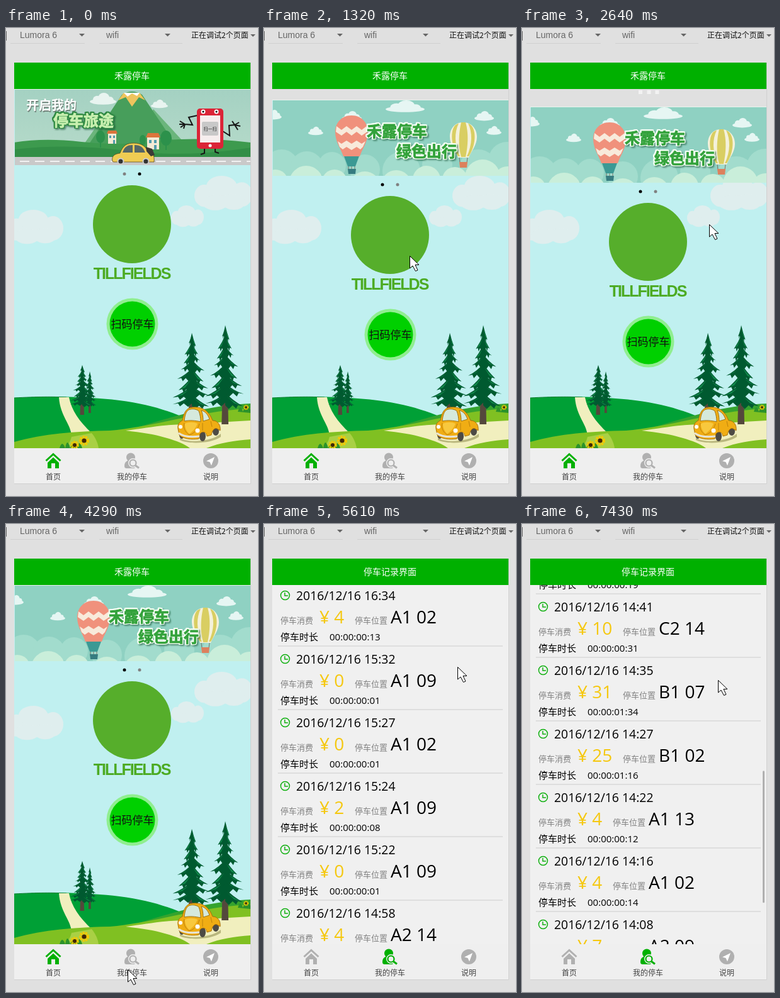
Animation, 400 px wide and 744 px high, one loop 8 s. Source, as an HTML page:

```html
<!DOCTYPE html>
<html lang="zh">
<head>
<meta charset="utf-8">
<title>停车小程序</title>
<style>
html, body { margin: 0; width: 100%; height: 100%; overflow: hidden; background: #e0e0e0; }
svg { display: block; width: 100vw; height: 100vh; }
text { font-family: "Noto Sans CJK SC", "Noto Sans CJK", "Noto Sans", sans-serif; }
.num { font-family: "Open Sans", "Noto Sans", sans-serif; }
.bar { font: 14px "Liberation Sans", Roboto, sans-serif; fill: #666; }
.mid { text-anchor: middle; }
.tab { font-size: 12px; fill: #444; text-anchor: middle; }
.art {
  --edge: #f4fff4; font-size: 24px; font-weight: 900; fill: #33a23b; stroke: #33a23b; stroke-width: .8px;
  filter: drop-shadow(1.2px 0 var(--edge)) drop-shadow(-1.2px 0 var(--edge)) drop-shadow(0 1.2px var(--edge))
    drop-shadow(0 -1.2px var(--edge)) drop-shadow(2px 2px 1px rgba(20, 80, 50, .55));
}
.trip { --edge: #2f8a43; fill: #c9f0b0; stroke: #c9f0b0; }
</style>
</head>
<body>
<svg viewBox="0 0 400 744" preserveAspectRatio="none">
<defs>
  <g id="cloud">
    <ellipse cx="50" cy="42" rx="50" ry="13"/><circle cx="28" cy="32" r="16"/>
    <circle cx="53" cy="24" r="21"/><circle cx="76" cy="34" r="14"/>
  </g>
  <g id="puff">
    <ellipse cx="50" cy="32" rx="44" ry="22"/><ellipse cx="17" cy="34" rx="17" ry="19"/>
    <ellipse cx="47" cy="17" rx="26" ry="17"/><ellipse cx="82" cy="32" rx="18" ry="21"/>
    <ellipse cx="36" cy="46" rx="22" ry="13"/><ellipse cx="68" cy="45" rx="20" ry="13"/>
  </g>
  <g id="flower">
    <circle r="6" fill="none" stroke="#f8c800" stroke-width="6" stroke-dasharray="3 1.2"/><circle r="4" fill="#402808"/>
  </g>
  <clipPath id="screen"><rect x="13" y="97" width="375" height="571"/></clipPath>
  <clipPath id="strip"><rect x="14" y="98" width="374" height="120"/></clipPath>
  <linearGradient id="haze" x2="0" y2="1"><stop stop-color="#a4d1c2"/><stop offset="1" stop-color="#b9dccb"/></linearGradient>
</defs>

<rect width="400" height="744" fill="#e0e0e0"/>
<path d="M0 5h1v15H0z" fill="#666"/>
<path d="M7 24.500h118M148 24.500h132" stroke="#d0d0d0"/>
<text class="bar" x="22" y="16">Lumora 6</text>
<text class="bar" x="159" y="16">wifi</text>
<path d="M116 9h9l-4.500 4.500zM252 9h9l-4.500 4.500zM388 10h8l-4 4z" fill="#666"/>
<text x="294" y="16" font-size="12" fill="#111">正在调试2个页面</text>
<path d="M388.500 55v669.500H13" fill="none" stroke="#d0d0d0"/>

<g id="home" clip-path="url(#screen)">
  <rect x="13" y="97" width="375" height="571" fill="#c0f0f0"/>
  <g fill="#dfeeee">
    <use href="#puff" transform="translate(1 289) scale(.9 .92)"/>
    <use href="#puff" transform="translate(262 282) scale(.52 .58)"/>
    <use href="#puff" transform="translate(299 235) scale(.92 .93)"/>
  </g>
  <path d="M13 588C70 585 130 586 180 592C220 597 250 606 275 616L388 640V668H13z" fill="#00a036"/>
  <path d="M13 588C50 586 75 586 96 587" fill="none" stroke="#087c2c"/>
  <path d="M84 587H100C104 608 116 625 136 644L104 650C104 630 86 618 84 587z" fill="#f1efbe"/>
  <path d="M200 637C250 624 310 600 388 597V640H200z" fill="#35a32e"/>
  <path d="M13 658C60 645 110 641 165 640C235 634 310 608 388 605V668H13z" fill="#80c022"/>
  <path d="M388 624C340 627 300 629 262 631C235 633 215 637 190 640C215 643 236 646 252 651C270 656 283 661 292 668H388z" fill="#f1efbe"/>
  <path d="M318 668C340 659 362 656 388 654V668z" fill="#80c022"/>
  <path d="M104 650L136 644C142 651 146 660 147 668H92C98 664 102 658 104 650z" fill="#a9d045"/>
  <g id="trees"></g>
  <path d="M85 668q4-14 9 0q3-18 8 0q4-14 10 0q4-16 9 0M368 610q4-14 8 0q4-12 12-4v6z" fill="#2b922b"/>
  <use href="#flower" transform="translate(124 656) scale(.9)"/>
  <use href="#flower" transform="translate(109 663) scale(.75)"/>
  <use href="#flower" transform="translate(381 603) scale(.45)"/>
  <g>
    <path d="M276 652C290 660 325 658 341 645V650C325 661 290 662 276 655z" fill="#b9b77e"/>
    <g fill="#4d4a44"><ellipse cx="312" cy="649" rx="5" ry="8"/><ellipse cx="333" cy="641" rx="5" ry="7"/><ellipse cx="279" cy="646" rx="4" ry="7"/></g>
    <path d="M273 637C272 629 276 626 280 624C282 612 286 605 293 603.500C305 601 316 605 321 612C325 616 326 620 328 624C336 624 341 631 340 640L335 637C331 635 327 640 326 647L319 649C318 642 312 640 308 645L306 653C295 655 280 653 275 647z" fill="#f0ad14" stroke="#a8700c"/>
    <path d="M283 625C284 613 287 607 293 606C299 605 304 607 306 609C308 614 309 620 309 626C301 624 291 623 283 625z" fill="#d5e9dc" stroke="#9c7414"/>
    <path d="M310 608C316 609 321 615 323 622L313 625C313 618 312 612 310 608z" fill="#d5e9dc" stroke="#9c7414"/>
    <path d="M283 628C281 636 284 642 291 647C300 644 305 637 307 629M312 628V640M325 625L327 634" fill="none" stroke="#bd820c"/>
    <path d="M284 629C290 626 298 626 304 629C301 636 297 641 291 645C286 641 284 635 284 629z" fill="#f8c83e"/>
    <circle cx="277" cy="634" r="3" fill="#fff"/><circle cx="304" cy="640" r="3.500" fill="#fff"/>
    <path d="M274 644Q285 652 307 649" fill="none" stroke="#e6e4d8" stroke-width="3"/>
  </g>
  <rect id="gap" x="13" y="97" width="375" height="0" fill="#e0e0e0"/>
  <g id="body">
    <path d="M185 71h6v6h-6zm13.500 0h6v6h-6zm13 0h6v6h-6z" fill="#f2f2f2"/>
    <path d="M13 97.500H388" stroke="#e8f4ee"/>
    <g clip-path="url(#strip)"><g id="slides">
      <g>
        <rect x="13" y="98" width="376" height="120" fill="#8fd1c2"/>
        <g fill="#a2dccd"><circle cx="28" cy="203" r="27"/><circle cx="68" cy="205" r="26"/><circle cx="108" cy="202" r="22"/><circle cx="160" cy="208" r="24"/><circle cx="218" cy="210" r="30"/><circle cx="275" cy="200" r="24"/><circle cx="340" cy="206" r="30"/><circle cx="386" cy="194" r="30"/></g>
        <g fill="#c9eeda"><circle cx="18" cy="228" r="20"/><circle cx="67" cy="229" r="27"/><circle cx="112" cy="228" r="20"/><circle cx="160" cy="236" r="25"/><circle cx="210" cy="233" r="24"/><circle cx="258" cy="224" r="22"/><circle cx="303" cy="224" r="20"/><circle cx="347" cy="220" r="28"/><circle cx="386" cy="223" r="20"/></g>
        <g fill="#e6f6f3">
          <use href="#cloud" transform="translate(4 112) scale(.24 .3)"/><use href="#cloud" transform="translate(124 114) scale(.31 .3)"/>
          <use href="#cloud" transform="translate(193 97) scale(.62 .36)"/><use href="#cloud" transform="translate(334 114) scale(.31 .3)"/>
          <use href="#cloud" transform="translate(70 139) scale(.24 .26)"/><use href="#cloud" transform="translate(353 138) scale(.24 .27)"/>
        </g>
        <path d="M126 184L133 203H145L152 184z" fill="#3b9994"/>
        <path d="M139 122C122 122 113 135 113 148C113 164 122 175 126 187H152C156 175 165 164 165 148C165 135 156 122 139 122z" fill="#f0917c"/>
        <path d="M115 139l8 6l8-6l8 6l8-6l8 6l8-6l1 9l-9 6l-8-6l-8 6l-8-6l-8 6l-9-6zM117 163l6 4l8-5l8 5l8-5l8 5l6-4l-4 9l-4 4l-6-4l-8 5l-8-5l-6 4l-5-4z" fill="#f8eadb"/>
        <path d="M134 203v5M139 203v5M144 203v5" stroke="#78716b"/><path d="M133 207h13l-1 8h-11z" fill="#367c80"/>
        <path d="M316 133C302 133 295 144 295 156C295 170 305 180 308 189H325C328 180 338 170 338 156C338 144 330 133 316 133z" fill="#f4f1db"/>
        <path d="M304 137C295 146 297 171 308 187H311C302 168 302 149 309 134.500zM313 133h7C325 150 324 170 320 188H313C308 170 309 150 313 133zM328 137C338 146 336 171 325 187H322C331 168 331 149 324 134.500z" fill="#d9ce62"/>
        <path d="M310 189l1 8M323 189l-1 8" stroke="#78716b"/><path d="M310 196h13l-1 9h-11z" fill="#dc815d"/>
        <text class="art" x="163" y="156">禾露停车</text><text class="art" x="210" y="188">绿色出行</text>
      </g>
      <g transform="translate(375)">
        <rect x="13" y="98" width="376" height="120" fill="url(#haze)"/>
        <path d="M120 190L157 137L180 190zM198 190L234 129L290 190z" fill="#6bb57c"/>
        <path d="M128 190L184 106Q200 96 216 106L272 190z" fill="#479e5b"/>
        <path d="M178 115L187 103H212L221 115L211 110L200 125L190 110z" fill="#eec45d"/>
        <path d="M187 103H212L208 108L200 104L193 109z" fill="#fff"/>
        <path d="M13 182Q60 174 120 181T240 180T389 182V208H13z" fill="#3d9a4e"/>
        <path d="M13 193Q100 183 190 195T389 190V208H13z" fill="#328e46"/>
        <g fill="#e8f4f0"><use href="#cloud" transform="translate(133 102) scale(.42 .36)"/><use href="#cloud" transform="translate(230 113) scale(.27 .26)"/></g>
        <g fill="#2c914b"><ellipse cx="150" cy="173" rx="7" ry="10"/><ellipse cx="254" cy="175" rx="9" ry="12"/><ellipse cx="217" cy="178" rx="5" ry="8"/><path d="M149 180h2v10h-2zm104 0h2v14h-2z"/></g>
        <path d="M162 167h13v17h-13zM224 173h19v20h-19z" fill="#f4ead6"/>
        <path d="M160 168l2-5h13l2 5zM222 174l3-7h17l3 7z" fill="#db743c"/>
        <path d="M164 171h3v4h-3zm6 0h3v4h-3zm0 7h3v6h-3zM227 178h4v5h-4zm8 0h4v5h-4zm0 8h4v7h-4z" fill="#529cad"/>
        <path d="M13 205H389V218H13z" fill="#c9c9c9"/>
        <path d="M22 212H389" stroke="#fff" stroke-width="1.500" stroke-dasharray="15 9"/>
        <path d="M169 212C167 203 173 200 181 199C186 186 192 183 203 183C216 183 222 189 225 196C233 197 236 202 235 213H171z" fill="#f0cc53" stroke="#5c4a1c" stroke-width=".8"/>
        <path d="M185 198C188 189 192 186 201 186V198zM204 186C214 186 218 190 221 198H204z" fill="#566"/>
        <path d="M222 189l10 3l4 10l-6 2l-7-8z" fill="#3c3a35"/>
        <g fill="#333" stroke="#ccc" stroke-width="2"><circle cx="182" cy="212" r="4.500"/><circle cx="222" cy="212" r="4.500"/></g>
        <text x="33" y="132" font-size="20" font-weight="900" fill="#73857c">开启我的</text>
        <text x="32" y="130" font-size="20" font-weight="900" fill="#fff">开启我的</text>
        <text class="art trip" x="75" y="156">停车旅途</text>
        <path d="M304 139L290 142L296 154L284 153M284 153l-8-5m8 5l-9 0m9 0l-7 5m7-5l-2 7M344 164L355 171L354 155L363 154M363 154l-4-6m4 6l7-4m-7 4l9 2m-9-2l5 8M315 191v8l-6 2M332 191v6l6 2" fill="none" stroke="#161616" stroke-width="2"/>
        <rect x="303" y="128" width="42" height="64" rx="5" fill="#db2437"/>
        <rect x="308" y="139" width="32" height="43" fill="#f6eeee"/><rect x="311" y="149" width="26" height="22" rx="2" fill="#c8c8c8"/>
        <text class="mid" x="324" y="163" font-size="7" fill="#222">扫一扫</text>
        <circle cx="313" cy="133" r="3.500" fill="#fff"/><circle cx="334" cy="133" r="3.500" fill="#fff"/><circle cx="313" cy="133" r="1.500"/><circle cx="334" cy="133" r="1.500"/><circle cx="324" cy="187" r="2.500" fill="#fff"/>
      </g>
    </g></g>
    <circle id="dotA" cx="188" cy="232" r="2.500"/><circle id="dotB" cx="212" cy="232" r="2.500"/>
    <circle cx="200" cy="312" r="62" fill="#56ae2b"/>
    <text class="mid" x="199.500" y="399" style="font:700 25px 'Liberation Sans',sans-serif;letter-spacing:-2px" fill="#4cab23">TILLFIELDS</text>
    <circle cx="200.500" cy="470.500" r="41" fill="#90ee90"/><circle cx="200.500" cy="470.500" r="36" fill="#00d000"/>
    <text class="mid" x="200.500" y="476.500" font-size="17" font-weight="500" fill="#111">扫码停车</text>
  </g>
</g>

<g id="list" clip-path="url(#screen)">
  <rect x="13" y="97" width="375" height="571" fill="#f0f0f0"/>
  <g id="rows"></g>
  <rect id="thumb" x="382" width="3" height="210" rx="1.500" fill="#b0b0b0"/>
</g>

<rect x="13" y="55" width="375" height="42" fill="#00b000"/>
<text id="title" class="mid" x="200" y="81" font-size="14" fill="#fff"></text>
<rect x="13" y="668" width="375" height="56" fill="#efefef"/>
<g id="tabHome">
  <path d="M63.500 688L75 677.500L86.500 688" fill="none" stroke="currentColor" stroke-width="3"/>
  <path d="M75 682.500L84 691V700H78V692H72V700H66V691z" fill="currentColor"/>
</g>
<g id="tabMine">
  <circle cx="198" cy="682.500" r="7" fill="currentColor"/>
  <path d="M188 696C188 690 192 687 198 687L208 690L204 700H192C189 700 188 699 188 696z" fill="currentColor"/>
  <circle cx="201.500" cy="691.500" r="5.500" fill="#efefef" stroke="#efefef" stroke-width="4"/>
  <path d="M205.500 695.500L211 700" stroke="#efefef" stroke-width="5"/>
  <circle cx="201.500" cy="691.500" r="5" fill="none" stroke="currentColor" stroke-width="2.200"/>
  <path d="M205.500 695.500L211 699.500" stroke="currentColor" stroke-width="3"/>
</g>
<circle cx="325" cy="688" r="12" fill="#b0b0b0"/>
<path d="M331 682L318 688.500L323.500 690L326 695.500z" fill="#fff"/>
<text class="tab" x="75" y="718">首页</text><text class="tab" x="200" y="718">我的停车</text><text class="tab" x="325" y="718">说明</text>
<path id="cursor" d="M.5.500V20L5 16L9.500 24.500L13 23L9 14.500H15z" fill="#fff" stroke="#000"/>
</svg>

<script>
const $ = id => document.getElementById(id);

// Fir tree: a thin trunk with drooping boughs that widen towards the ground
function fir(x, top, h, w) {
  const levels = 8, leafH = h * .8;
  let s = `<path d="M${x - w * .08} ${top + h * .3}h${w * .16}l${w * .06} ${h * .7}h${-w * .3}z" fill="#54483c"/>`;
  for (let i = levels; i-- > 0;) {
    const y = top + leafH * i / levels, step = leafH / levels, r = w * ((i + 1) / levels) ** .8;
    for (const side of [-1, 1]) {
      const k = side * r * (.88 + .12 * Math.sin(i * 2.4 + side)), end = y + step * (1.05 + .2 * Math.sin(i * 1.7 + side));
      s += `<path d="M${x} ${y - step * .3}Q${x + k * .4} ${y + step * .5} ${x + k} ${end}L${x + k * .72} ${end - step * .1}`
        + `L${x + k * .62} ${end + step * .25}L${x + k * .42} ${end - step * .1}L${x + k * .2} ${end + step * .3}L${x} ${end - step * .1}z" fill="#005a30"/>`
        + `<path d="M${x + k * .1} ${y + step * .1}Q${x + k * .4} ${y + step * .6} ${x + k * .85} ${end - step * .1}L${x + k * .5} ${end - step * .3}z" fill="#128a4c"/>`;
    }
  }
  return s;
}
$('trees').innerHTML = fir(133, 548, 64, 13) + fir(121, 538, 77, 22)
  + fir(295, 489, 139, 35) + fir(348, 477, 153, 36);

const records = `16:34 4 A1 02 00:13|15:32 0 A1 09 00:01|15:27 0 A1 02 00:01|15:24 2 A1 09 00:08
15:22 0 A1 09 00:01|14:58 4 A2 14 00:12|14:56 2 A1 13 00:08|14:48 6 A1 02 00:19|14:41 10 C2 14 00:31
14:35 31 B1 07 01:34|14:27 25 B1 02 01:16|14:22 4 A1 13 00:12|14:16 4 A1 02 00:14|14:08 7 A2 09 00:22
14:02 3 A1 02 00:10`.split(/[|\n]/);

$('rows').innerHTML = records.map((rec, i) => {
  const [time, cost, zone, spot, span] = rec.split(' ');
  const dx = (cost.length - 1) * 16;
  return `<g transform="translate(0 ${i * 101})">
    <g fill="none" stroke="#10b010" stroke-width="1.500"><circle cx="33.500" cy="113.500" r="7"/><path d="M33 109v5h5"/></g>
    <text class="num" x="51" y="121" font-size="19.400">2016/12/16 ${time}</text>
    <text x="26" y="158" font-size="13" fill="#808080">停车消费</text>
    <text class="num" x="88" y="158" font-size="28" fill="#f5c810">¥ ${cost}</text>
    <text x="${144 + dx}" y="158" font-size="13" fill="#808080">停车位置</text>
    <text class="num" x="${201 + dx}" y="158" font-size="28">${zone} ${spot}</text>
    <text x="26" y="185" font-size="15">停车时长</text>
    <text class="num" x="104" y="185" font-size="15">00:00:${span}</text>
    <path d="M22 194h357" stroke="#dedede" stroke-width="2"/></g>`;
}).join('');

// Tracks hold each value until the next tick
const STEP = 330, LOOP = 8000, REST = 5940;
const slide = [1, .74, .22, 0];
const pull = [0, 0, 0, 0, 17, 160, 75, 50, 28, 0];
const scroll = [0, 77, 320, 570, 790];
const path = [[-50, 0], [215, 668], [210, 640], [205, 593], [231, 362], [250, 655], [285, 480], [295, 390],
  [297, 312], [303, 265], [228, 463], [137, 720], [181, 711], [193, 708], [193, 708], [339, 702], [310, 246],
  [307, 227], [270, 407], [308, 232], [309, 236], [310, 242], [311, 248]];
const hold = (track, i) => track[Math.max(0, Math.min(i, track.length - 1))];

function draw(t) {
  // The pointer rests 170 ms longer before the list is dragged
  const moved = t < REST ? t : Math.max(REST - 1, t - 170);
  const tick = Math.floor(moved / STEP + 1e-6);
  const onList = tick >= 14, y = hold(pull, tick), s = hold(scroll, tick - 18);
  $('home').style.display = onList ? 'none' : '';
  $('list').style.display = onList ? '' : 'none';
  $('title').textContent = onList ? '停车记录界面' : '禾露停车';
  $('tabHome').style.color = onList ? '#b0b0b0' : '#00b000';
  $('tabMine').style.color = onList ? '#00b000' : '#b0b0b0';
  $('body').setAttribute('transform', `translate(0 ${y})`);
  $('gap').setAttribute('height', y);
  $('slides').setAttribute('transform', `translate(${-375 * hold(slide, tick)})`);
  $('dotA').setAttribute('fill', tick ? '#000' : '#808080');
  $('dotB').setAttribute('fill', tick ? '#808080' : '#000');
  $('rows').setAttribute('transform', `translate(0 ${-s})`);
  $('thumb').setAttribute('y', 100 + s * .37);
  $('thumb').style.display = s ? '' : 'none';
  $('cursor').setAttribute('transform', `translate(${hold(path, tick)})`);
}

const start = performance.now();
function frame() {
  draw((performance.now() - start) % LOOP);
  requestAnimationFrame(frame);
}
frame();
</script>
</body>
</html>
```
